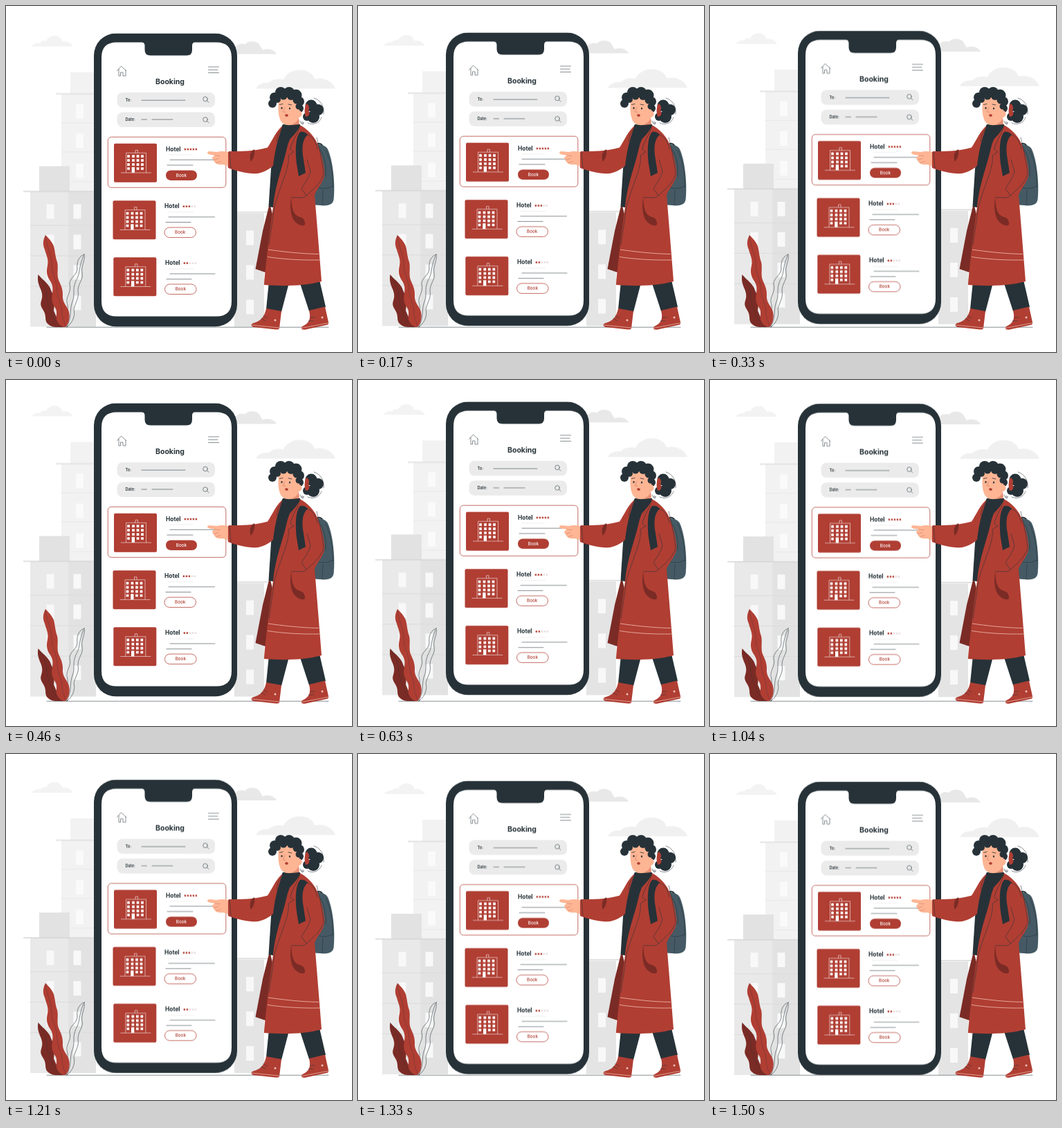
An HTML page that plays this animation: 500x500 px, repeating every 1.54 s.

```html
<!DOCTYPE html>
<html lang="en">
<head>
<meta charset="utf-8">
<title>Hotel booking</title>
<style>
  html, body { margin: 0; width: 100%; height: 100%; overflow: hidden; background: #fff; }
  svg { display: block; width: 100vw; height: 100vh; }
  text { font-family: Inter, "Open Sans", sans-serif; font-weight: 700; fill: #263238; }
  .float { animation: float 1540ms cubic-bezier(.36, 0, .64, 1) infinite; }
  @keyframes float {
    0% { transform: translateY(-.5px); }
    47% { transform: translateY(-9px); }
    98.5%, 100% { transform: translateY(0); }
  }
  .red { fill: #b03e33; }
  .deep { fill: #7b2b25; }
  .dark { fill: #263238; }
  .skin { fill: #fdb594; }
  .line { fill: none; stroke: #263238; stroke-width: .55; stroke-linecap: round; stroke-linejoin: round; }
  .soft { stroke: #d8dadb; stroke-width: .4; }
  .edge { fill: none; stroke: #b03e33; stroke-width: .75; }
  .pale { fill: #e6dbd9; }
  .title { font-size: 8.4px; }
  .book { font-size: 6.3px; font-weight: 500; text-anchor: middle; }
  .label { font-size: 5.6px; font-weight: 600; }
</style>
</head>
<body>
<svg viewBox="0 0 500 500">
  <defs>
    <path id="star" d="M0-2.1 .6-.7 2.1-.6 1-.4 1 .4 1.3 1.8 0 1-1.3 1.8-1 .4-2.1-.6-.6-.7Z"/>
    <g id="pic">
      <rect class="red" width="62" height="56" rx="2"/>
      <path d="M10 42.200H54M17.500 42V13.500H46.500V42M31 13.500V9.500H34.500V13.500" fill="none" stroke="#fff" stroke-width=".55"/>
      <path d="M21 16.500V38M28 16.500V32M34.500 16.500V38M41 16.500V38" stroke="#fff" stroke-width="3.700" stroke-dasharray="3.800 2.200"/>
      <path d="M25.700 34H30V42H25.700Z" fill="#fff"/>
    </g>
    <g id="lens" class="line"><circle r="3.300"/><path d="M2.400 2.400 5 4.600"/></g>
    <rect id="win" width="11" height="21"/>
  </defs>

  <g class="float">
    <!-- clouds -->
    <path fill="#f3f3f3" d="M37 59C40 55 45 53 49 54C52 50 56 50 58 51C60 46 66 43 72 43.500C77 44 80 48 82 52C88 50 94 54 97 59Z"/>
    <path fill="#e8e8e8" d="M318 70L333 58C338 54 342 55 345 56C350 50 362 50 366 56C368 59 369 62 371 64C380 61 388 64 391 70Z"/>
    <path fill="#f0f0f0" d="M361 120C364 113 372 111 380 111.500C384 106 396 105 401 107C404 98 415 92 426 93C436 93 444 99 446 106C458 103 472 108 476 120Z"/>

    <!-- buildings -->
    <path fill="#f2f2f2" d="M93 96H130V127H93ZM80 128H130V290H80Z"/>
    <path fill="#e4e4e4" d="M72 126.500H130V128.500H72Z"/>
    <path fill="#e9e9e9" d="M80 169H130V170H80ZM80 211H130V212H80ZM80 254H130V255H80Z"/>
    <g fill="#fafafa">
      <use href="#win" x="101" y="142"/><use href="#win" x="101" y="185"/><use href="#win" x="101" y="228"/>
    </g>
    <path fill="#e2e2e2" d="M48 232H92V268H48ZM90 269H130V464H90Z"/>
    <path fill="#e9e9e9" d="M35 269H90V464H35Z"/>
    <path fill="#d5d5d5" d="M25 267.800H130V269.300H25Z"/>
    <path fill="#dcdcdc" d="M35 317H130V318H35ZM35 361H130V362H35ZM35 405H130V406H35Z"/>
    <g fill="#f8f8f8">
      <use href="#win" x="58.500" y="287"/><use href="#win" x="97.500" y="287"/>
      <use href="#win" x="58.500" y="331"/><use href="#win" x="97.500" y="331"/>
      <use href="#win" x="58.500" y="375"/><use href="#win" x="97.500" y="375"/>
      <use href="#win" x="97.500" y="419"/>
    </g>
    <path fill="#e4e4e4" d="M330 300H373V464H330Z"/>
    <path fill="#d5d5d5" d="M330 297.800H379V299.300H330Z"/>
    <g fill="#f8f8f8">
      <use href="#win" x="347" y="325"/><use href="#win" x="347" y="375"/><use href="#win" x="347" y="425"/>
    </g>

    <!-- phone -->
    <rect class="dark" x="127" y="40" width="207" height="424" rx="32"/>
    <path fill="#fff" d="M160 53H196Q200.500 53 200.500 58V64Q200.500 72 209 72H261Q269 72 269 64V58Q269 53 273 53H304Q326 53 326 75V427Q326 449 304 449H160Q138 449 138 427V75Q138 53 160 53Z"/>

    <path class="line" d="M160.500 94 166.500 87.500 173.500 94M163 92V101.500H165.500V96.500H169V101.500H173V93.500"/>
    <path class="line" d="M292.500 88.500H307.500M292.500 92.700H306M292.500 97H307.500"/>
    <text x="237" y="113.200" font-size="10.500" text-anchor="middle">Booking</text>

    <rect x="160.500" y="125.500" width="141.500" height="21.500" rx="8" fill="#ebebeb"/>
    <rect x="160.500" y="154" width="141.500" height="21.500" rx="8" fill="#ebebeb"/>
    <text class="label" x="172.500" y="138.300">To:</text>
    <text class="label" x="172.500" y="166.200">Date:</text>
    <path class="line" d="M196 136.700H259M196 164.500H203.500M211 164.500H241"/>
    <use href="#lens" x="288" y="135"/><use href="#lens" x="288" y="164.500"/>

    <!-- hotels -->
    <rect class="edge" x="147.300" y="189.800" width="170.500" height="73" rx="5"/>
    <use href="#pic" x="156" y="199.300"/>
    <text class="title" x="231" y="210.500">Hotel</text>
    <g class="red">
      <use href="#star" x="259" y="207.500"/><use href="#star" x="263" y="207.500"/><use href="#star" x="267" y="207.500"/>
      <use href="#star" x="271" y="207.500"/><use href="#star" x="275" y="207.500"/>
    </g>
    <path class="line soft" d="M236 215.500H270"/>
    <path class="line" d="M237 222.800H310M233 230.500H270"/>
    <rect class="red" x="231" y="238" width="45" height="14.500" rx="7.200"/>
    <text class="book" x="253.500" y="247.500" style="fill:#fff">Book</text>

    <use href="#pic" x="154.500" y="281.700"/>
    <text class="title" x="229" y="293">Hotel</text>
    <g class="red"><use href="#star" x="257" y="290"/><use href="#star" x="261" y="290"/><use href="#star" x="265" y="290"/></g>
    <g class="pale"><use href="#star" x="269" y="290"/><use href="#star" x="273" y="290"/></g>
    <path class="line soft" d="M234 298.300H271"/>
    <path class="line" d="M235 305.400H301.500M231 313H267"/>
    <rect class="edge" x="229" y="320.500" width="45.500" height="14.500" rx="7.200"/>
    <text class="book" x="251.700" y="330" style="fill:#b03e33">Book</text>

    <use href="#pic" x="155.300" y="363.800"/>
    <text class="title" x="230" y="375">Hotel</text>
    <g class="red"><use href="#star" x="258" y="372"/><use href="#star" x="262" y="372"/></g>
    <g class="pale"><use href="#star" x="266" y="372"/><use href="#star" x="270" y="372"/><use href="#star" x="274" y="372"/></g>
    <path class="line soft" d="M235 380.500H271"/>
    <path class="line" d="M237 387.500H302M232 395.200H268"/>
    <rect class="edge" x="229.500" y="402.500" width="45.500" height="14.500" rx="7.200"/>
    <text class="book" x="252.300" y="412" style="fill:#b03e33">Book</text>
  </g>

  <path class="line" d="M59 464.200H466"/>

  <!-- plants -->
  <path class="line" d="M113 359C104 362 102 372 103 380C102 390 92 392 92 402C95 414 87 418 88 428C92 440 84 446 88 464C98 456 100 446 98 438C101 426 106 422 104 412C104 400 112 396 110 386C108 376 115 368 113 359ZM112 361C104 380 108 386 101 397C95 412 101 416 95 430C92 442 95 448 88 464"/>
  <path class="deep" d="M46.500 388C45 397 47 401 49 407C53 415 53 420 51 426C48 434 54 438 56 444C58 450 56 455 60 459C64 463 68 464 74 464H84C76 456 72 448 69 440C71 428 69 418 65 411C63 402 54 397 46.500 388Z"/>
  <path class="red" d="M57 331C53 339 53 345 56 352C58 360 62 366 60 375C58 384 59 390 63 396C68 403 68 408 67 415C65 424 67 430 71 436C75 442 72 448 73 453C75 460 80 464 86 464C92 458 93 447 90 439C86 431 81 427 82 417C82 408 79 403 76 396C73 388 76 378 74 370C71 362 71 354 69 347C66 340 62 336 57 331Z"/>
  <path class="line" stroke-opacity=".5" d="M57 333C59 350 67 360 66 377C68 392 74 396 74 412C75 426 82 432 81 446L86 463M48 391C57 405 59 412 59 424C64 440 66 452 80 464"/>

  <!-- backpack -->
  <path class="line" style="stroke-width:2" d="M449 203C448 197 457 197 458 205"/>
  <path fill="#455a64" d="M442 204C447 198 461 199 465 207C472 222 476 255 473.500 280C472 287 466 288 460 288.500L440 287Z"/>
  <path class="line" d="M450 204C461 212 463 235 462 246M462 208C470 226 473 244 472 262M449 262C458 265 466 264 473 260M458 266 457 288"/>

  <!-- legs -->
  <path class="dark" d="M380 398 376 438 398 442 409 400ZM424 398 438 441 462 435 453 396Z"/>
  <path class="red" d="M376 437 398 441 395 466Q394 468 390 467.500L358 464C353 463 354 459 358 458C367 456 374 449 376 437ZM438 440 461 434.500 466 457Q467 460 463 461L433 467.500C426 469 425 464 430 462C438 458 441 452 438 440Z"/>
  <path fill="none" stroke="#edb0a5" stroke-width=".8" d="M355 461 395 465M427 465.500 466 458"/>
  <path class="line" d="M369 452 375 455M372 448 378 451M437 455 444 455M440 450 446 450"/>
  <circle cx="389" cy="454" r="1.500" fill="#f3c3b8"/><circle cx="457" cy="450" r="1.500" fill="#f3c3b8"/>

  <!-- coat -->
  <path class="deep" d="M381 285 371 325 360.500 380 375 385 390 320Z"/>
  <path class="dark" d="M400 171 425 172 420 200 392 292 379.500 290 383 235 390 190Z"/>
  <path class="red" d="M425 172C432 176 441 183 447 193C455 207 460 230 460.500 242C459 256 450 262 446 273L451 335 456 398C430 405 400 405 373 403C374 385 380 335 386 290C388 268 394 248 400 228C405 212 406 202 410 193C416 186 422 181 425 172Z"/>
  <path class="red" d="M400 173C391 179 384 196 378 204.500C360 209.500 340 210.500 322 210L318.500 216 321 234C335 239 350 243 364 242C374 240 381 235 386 231C388 214 391 196 400 173Z"/>
  <path class="deep" d="M359 207C353 210 351 217 354 225C358 220 360 214 359 207ZM412 277C410 290 411 305 418 312C424 318 433 319 432 314C431 303 424 307 418 301C413 295 413 286 412 277Z"/>
  <path class="line" d="M424 176C420 188 413 196 411 207L416 211 408 216C411 232 395 262 388 290L380 345M399 176 393 186 391 196M323 211 325 234"/>
  <path class="line" d="M449 190C454 210 458 230 459 243C455 256 445 264 434 274L427 264C433 254 438 248 440 239L435 222M434 274C428 280 422 275 412 277"/>
  <path fill="none" stroke="#edb0a5" stroke-width=".9" d="M379 352C400 355 425 358 452 358.500M378 362.500C400 366 428 367.500 453 367"/>

  <!-- strap -->
  <path class="dark" d="M425 182C418 190 418 210 420 228L423 246 433 241 430 222C427 205 428 193 436 186C433 182 429 181 425 182Z"/>
  <path class="line" d="M432 186C441 185 448 195 450 207"/>

  <!-- hand -->
  <path class="skin" d="M321 211C313 209.500 309 210 305 211L294 210C290 210.500 290 213.500 294 214.500L302 216C298 217.500 297 220.500 300 222.500C301 227 305 230 313 229L321 231Z"/>
  <path class="line" style="stroke:#cb7d65" d="M302 216 309 216.500M300 222.500 307 220.500M304 226.500 310 224.500"/>

  <!-- head -->
  <g class="dark">
    <circle cx="385" cy="141" r="6"/><circle cx="388" cy="132" r="7"/><circle cx="397" cy="125" r="8"/>
    <circle cx="409" cy="125" r="8"/><circle cx="419" cy="129" r="8.500"/><circle cx="424" cy="138" r="7"/>
    <circle cx="424" cy="148" r="6"/><circle cx="441" cy="144" r="8.500"/><circle cx="451" cy="150" r="8"/>
    <circle cx="444" cy="160" r="9"/><circle cx="435" cy="160" r="6"/>
  </g>
  <path class="red" d="M434 141C438 143 439 147 437 151C440 155 438 160 433 160C431 154 431 146 434 141Z"/>
  <path class="line" d="M445 133C455 136 460 145 459 156M425 166C427 172 431 172 430 168M436 169C444 173 453 169 456 161"/>
  <path class="skin" d="M394 137C393 147 393 158 397 166C400 171 405 173 411 172L424 173 423 161C428 161 430 153 424 151L421 137C414 130 400 130 394 137Z"/>
  <path fill="#e58f73" d="M411 172C417 170 421 167 423 162L424 173Z"/>
  <path class="dark" d="M400 172C408 174 418 171 425 171L424 176H399Z"/>
  <g class="dark">
    <circle cx="392" cy="135" r="5"/><circle cx="401" cy="130" r="5.500"/><circle cx="412" cy="130" r="6"/>
    <circle cx="420" cy="136" r="5.500"/><circle cx="423" cy="145" r="4.500"/>
    <ellipse cx="398.500" cy="147.500" rx="1.100" ry="1.500"/><ellipse cx="410" cy="148" rx="1.100" ry="1.500"/>
  </g>
  <path class="line" style="stroke-width:.8" d="M395.500 142.500 400 141.500M408 142 413 143"/>
  <path class="line" style="stroke:#c7745c" d="M403 146 400.500 153 404 153.500"/>
  <path class="red" d="M403 157.500C404.500 155.500 407 156 408 158C406.500 161 403.500 160.500 403 157.500Z"/>
  <circle cx="428" cy="169" r="1.300" fill="#fff" stroke="#263238" stroke-width=".5"/>
</svg>
</body>
</html>
```
